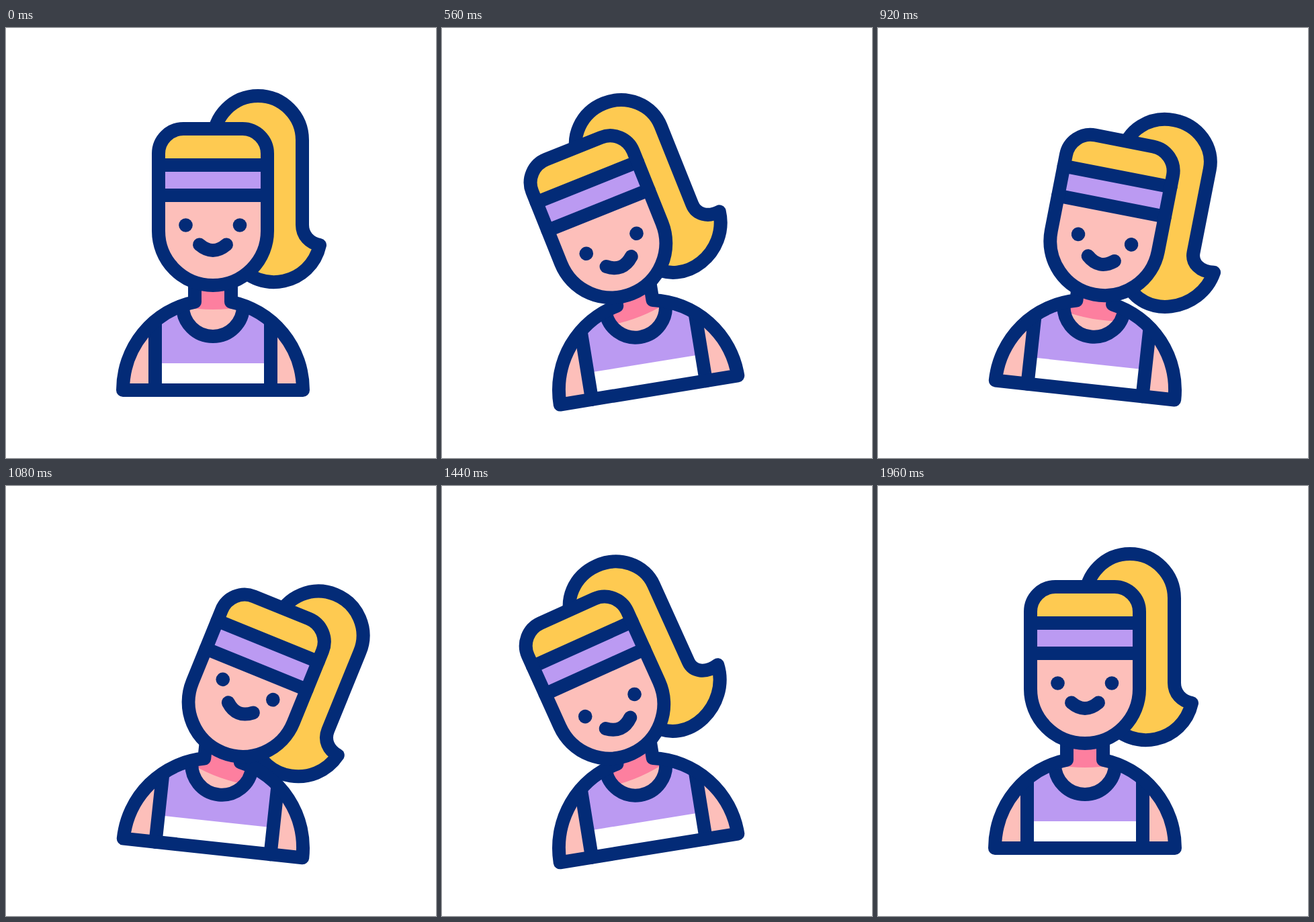
These frames come from a looping animation (640 by 640 pixels, 2000 ms). An HTML page:

```html
<!DOCTYPE html>
<html lang="en">
<head>
<meta charset="utf-8">
<title>Swaying athlete</title>
<style>
  html, body { margin: 0; width: 100%; height: 100%; overflow: hidden; background: #fff; }
  svg { display: block; width: 100vw; height: 100vh; }
  .line { fill: none; stroke: #032b77; stroke-width: 20; stroke-linecap: round; stroke-linejoin: round; }
  .ink { fill: #032b77; }
  .hair { fill: #feca51; }
  .cloth { fill: #bb9af2; }
  .skin { fill: #fdbfba; }
  .shade { fill: #fd7f9f; }
  .white { fill: #fff; }
</style>
</head>
<body>
<svg viewBox="0 0 640 640">
  <defs>
    <path id="headShape" d="M227 187A37 37 0 0 1 264 150H352A37 37 0 0 1 389 187V302A81 81 0 0 1 227 302Z"/>
    <path id="bodyShape" d="M174 539A134 134 0 0 1 281 407.7V380H335V407.7A134 134 0 0 1 442 539Z"/>
    <path id="neckShape" d="M281 380H335V407.7L353 414A45 45 0 0 1 263 414L281 407.7Z"/>
    <clipPath id="headClip"><use href="#headShape"/></clipPath>
    <clipPath id="neckClip"><use href="#neckShape"/></clipPath>
  </defs>
  <g id="body">
    <g class="headMotion">
      <path id="tailFill" class="hair"/>
      <path id="tailLine" class="line"/>
    </g>

    <use href="#bodyShape" class="skin"/>
    <path class="cloth" d="M222 539V436A134 134 0 0 1 394 436V539Z"/>
    <rect class="white" x="222" y="499" width="172" height="40"/>
    <use href="#neckShape" class="skin"/>
    <g clip-path="url(#neckClip)">
      <path class="shade headMotion" d="M200 300H416V395Q308 443 200 395Z"/>
    </g>
    <path class="line" d="M222 437V539M394 437V539M263 414A45 45 0 0 0 353 414"/>
    <use href="#bodyShape" class="line"/>

    <g class="headMotion">
      <use href="#headShape" class="skin"/>
      <g clip-path="url(#headClip)">
        <rect class="hair" x="220" y="140" width="176" height="64"/>
        <rect class="cloth" x="220" y="204" width="176" height="45"/>
      </g>
      <path class="line" d="M227 204H389M227 249H389"/>
      <g id="face">
        <circle class="ink" cx="267.5" cy="293.5" r="10.3"/>
        <circle class="ink" cx="348" cy="293.5" r="10.3"/>
        <path class="line" d="M288 322.5Q308 339.5 328 322.5"/>
      </g>
      <use href="#headShape" class="line"/>
    </g>
  </g>
</svg>
<script>
  const LOOP = 2000;
  const byId = id => document.getElementById(id);
  const body = byId('body');
  const face = byId('face');
  const tailParts = [byId('tailFill'), byId('tailLine')];
  const headParts = document.querySelectorAll('.headMotion');

  // Each part follows the one before it with a short delay.
  const BODY_KEYS = [200, 600, 1000, 1400, 1755];
  const HEAD_KEYS = [280, 680, 1080, 1480, 1860];
  const LOOSE_KEYS = [360, 760, 1160, 1560, 1940];

  const mix = (a, b, k) => a + (b - a) * k;
  const smooth = s => s * s * (3 - 2 * s);

  // Rest, left, right, left, rest.
  function sway(t, keys, left, right) {
    const values = [0, left, right, left, 0];
    if (t <= keys[0] || t >= keys[4]) return 0;
    const i = keys.findIndex(key => t < key);
    const s = (t - keys[i - 1]) / (keys[i] - keys[i - 1]);
    return mix(values[i - 1], values[i], smooth(s));
  }

  // Curling lifts the tip, flattens the crown and swells the lower lobe.
  function tailPath(curl) {
    const point = (x, y, dx, dy) => `${x + dx * curl} ${y + dy * curl}`;
    return `M309 167A66 ${66 - 7 * curl} 0 0 1 441 167V293` +
      `C441 309 ${point(452, 320, 6, 0)} ${point(467, 323, 15, -10)}` +
      `C${point(454, 381.6, 22, -6)} ${point(379, 398, 12, 14)} ${point(343, 350, 12, 8)}Z`;
  }

  function draw(t) {
    const lean = sway(t, BODY_KEYS, -9.5, 8);
    const tilt = sway(t, HEAD_KEYS, -16, 16);
    const sink = sway(t, HEAD_KEYS, 1, 1);
    const slide = sway(t, LOOSE_KEYS, 17.5, -15);
    const tail = tailPath(sway(t, LOOSE_KEYS, 1, 0));

    body.setAttribute('transform', `rotate(${lean} 308 539)`);
    for (const part of headParts) {
      part.setAttribute('transform', `translate(${-2 * sink} ${13 * sink}) rotate(${tilt} 308 386)`);
    }
    face.setAttribute('transform', `translate(0 ${slide})`);
    for (const part of tailParts) part.setAttribute('d', tail);
  }

  const start = performance.now();
  function tick() {
    draw((performance.now() - start) % LOOP);
    requestAnimationFrame(tick);
  }
  draw(0);
  requestAnimationFrame(tick);
</script>
</body>
</html>
```
